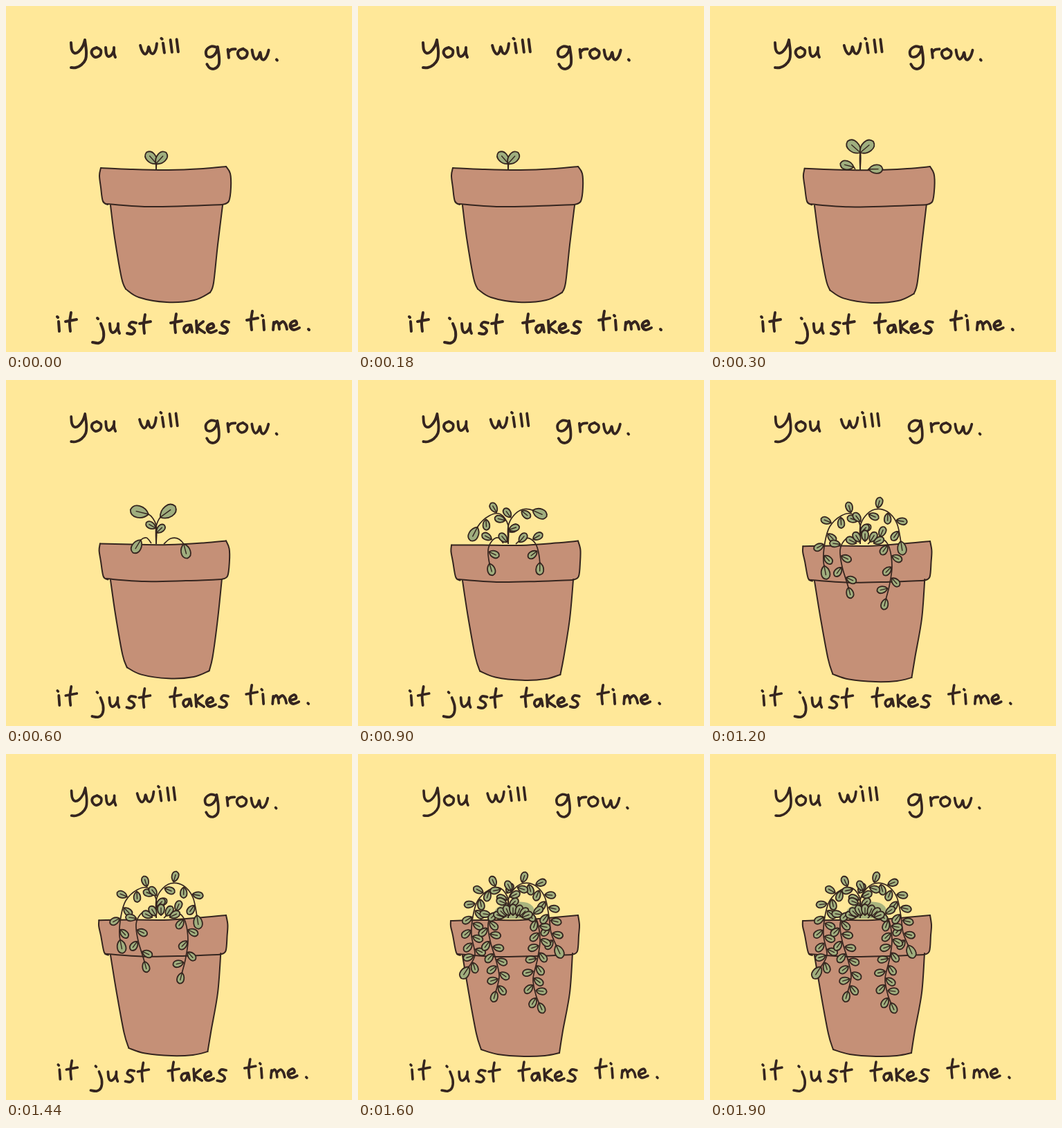
Recreate the animation shown at these times as an HTML page. Size 500 by 500 pixels, loop 2100 ms.

```html
<!DOCTYPE html>
<html lang="en">
<head>
<meta charset="utf-8">
<title>You will grow</title>
<style>
html, body { margin: 0; width: 100%; height: 100%; overflow: hidden; background: #ffe899; }
svg { display: block; width: 100vw; height: 100vh; }
path { fill: none; stroke: #35251f; stroke-linecap: round; stroke-linejoin: round; }
.clay { fill: #c59077; stroke: none; }
.edge { stroke-width: 2; }
.leaf { fill: #9fae7e; stroke-width: 1.8; }
.vein { stroke-width: 1.4; }
.stem { stroke-width: 1.7; stroke-linecap: butt; }
.wash { fill: #a9b47e; }
/* poses stand side by side; the strip jumps from one to the next */
#strip { animation: grow 2100ms step-end infinite; }
@keyframes grow {
  0% { transform: translateX(0); }
  14.2857% { transform: translateX(-500px); }
  28.5714% { transform: translateX(-1000px); }
  42.8571% { transform: translateX(-1500px); }
  57.1429% { transform: translateX(-2000px); }
  76.1905%, 100% { transform: translateX(-2500px); }
}
</style>
</head>
<body>
<svg viewBox="0 0 500 500" role="img" aria-label="you will grow. it just takes time."><g id="strip"></g></svg>
<script>
const points = s => s.trim().split(/\s+/).map(p => p.split(',').map(Number));
const round = n => Math.round(n * 10) / 10;
const path = (d, cls, style = '') => `<path class="${cls}" d="${d}" style="${style}"/>`;

// smooth curve through "x,y x,y ..."
function curve(s, start = 'M') {
  const p = points(s);
  let d = start + p[0];
  for (let i = 0; i < p.length - 1; i++) {
    const a = p[i - 1] || p[i], b = p[i], c = p[i + 1], e = p[i + 2] || c;
    d += 'C' + [b[0] + (c[0] - a[0]) / 6, b[1] + (c[1] - a[1]) / 6,
                c[0] - (e[0] - b[0]) / 6, c[1] - (e[1] - b[1]) / 6].map(round) + ',' + c;
  }
  return d;
}

// hand lettering: advance and pen strokes, baseline at 0
const glyphs = {
  y: [30, '1,-21 2,-11 6,-6 12,-8 18,-16 21,-25|21,-25 23,-9 22,3 16,11 8,15 1,15'],
  o: [20, '8,-14 2,-11 1,-5 6,0 13,-3 14,-10 8,-14'],
  u: [26, '1,-14 2,-5 5,-1 10,-4 13,-10|13,-14 13,-6 15,0'],
  w: [33, '1,-13 3,-5 7,0 11,-4 13,-10 15,-2 19,0 23,-6 25,-14'],
  i: [11, '1,-14 2,0|-1,-21 0,-20'],
  l: [9, '1,-18 2,0'],
  g: [31, '16,-14 8,-15 1,-9 2,-1 9,0 15,-6 17,-14|17,-15 20,0 20,11 14,17 7,16 3,11'],
  r: [15, '1,-12 3,0|2,-8 6,-12 12,-13'],
  t: [19, '8,-27 6,-13 7,0|0,-14 16,-17'],
  j: [26, '14,-14 18,-2 17,9 11,14 2,13|9,-22 10,-21'],
  s: [18, '13,-15 6,-16 3,-11 9,-7 11,-3 7,1 0,0'],
  a: [18, '9,-11 3,-10 0,-5 3,0 8,-4 10,-11 12,-1'],
  k: [16, '0,-17 1,0|10,-16 2,-8 12,0'],
  e: [18, '1,-5 9,-8 7,-13 1,-10 0,-4 5,0 13,-3'],
  m: [21, '0,0 1,-11|1,-8 5,-12 8,-8 9,-1|9,-8 14,-12 18,-8 20,-1'],
  '.': [8, '4,-1 5,0']
};
const words = [
  { text: 'you', x: 93, y: 74, drift: 1 },
  { text: 'will', x: 194, y: 70, drift: -7, tilt: -4 },
  { text: 'grow.', x: 288, y: 73, drift: -2, tilt: 3 },
  { text: 'it', x: 75, y: 470, drift: 2 },
  { text: 'just', x: 123, y: 473, drift: -4 },
  { text: 'takes', x: 238, y: 472, drift: -6 },
  { text: 'time.', x: 348, y: 468, drift: -5, gap: 4 }
];

function lettering(age) {
  return words.map(({ text, x, y, drift, tilt = 0, gap = 0 }) => {
    let pen = 0;
    const letters = [...text].map(ch => {
      const [advance, ink] = glyphs[ch];
      const at = pen;
      pen += advance + gap;
      return `<g transform="translate(${at} 0)">` +
        path(ink.split('|').map(s => curve(s)).join(''), 'pen', `stroke-width:${round(4 - .4 * age)}`) + '</g>';
    });
    return `<g transform="translate(${round(x + drift * age * age)} ${y}) rotate(${tilt})">${letters.join('')}</g>`;
  }).join('');
}

// the pot settles and narrows as the plant ages
function pot(age) {
  const ease = age * age * (3 - 2 * age);
  const m = (from, to) => round(from + (to - from) * ease);
  const topRight = `318,${m(232, 233)}`;
  const lipRight = `${m(313, 309)},${m(287, 290)}`;
  const footLeft = `${m(173, 178)},${m(409, 427)}`;
  const footRight = `${m(295, 291)},${m(414, 432)}`;
  const rim = [
    `${m(147, 148)},${m(287, 291)} ${m(140, 142)},${m(282, 287)} 137,262 ${m(135, 134)},${m(245, 249)} ${m(137, 134)},${m(234, 241)}`,
    `${m(137, 134)},${m(234, 241)} 180,${m(236, 240)} 235,${m(237, 240)} 285,${m(235, 236)} ${topRight}`,
    `${topRight} ${m(324, 320)},${m(242, 247)} ${m(325, 319)},262 ${m(322, 317)},${m(282, 285)} ${lipRight}`,
    `${lipRight} 260,${m(289, 292)} 200,${m(290, 293)} ${m(146, 143)},${m(286, 289)}`
  ];
  const body = [
    `151,${m(288, 291)} ${m(157, 160)},${m(335, 345)} ${m(167, 171)},${m(393, 404)} ${footLeft}`,
    `${footLeft} ${m(192, 202)},${m(421, 434)} ${m(232, 240)},${m(428, 437)} ${m(272, 270)},${m(425, 436)} ${footRight}`,
    `${footRight} ${m(300, 296)},400 306,345 ${m(313, 310)},288`
  ];
  const fill = (edges, close) => path(edges.map((e, i) => curve(e, i ? 'L' : 'M')).join('') + close, 'clay');
  return fill(body, 'L300,270L160,270Z') + fill(rim, 'Z') +
    [...rim, ...body].map(e => path(curve(e), 'edge')).join('');
}

function leaf(x, y, turn, len) {
  const w = len * .38;
  return `<g transform="translate(${round(x)} ${round(y)}) rotate(${round(turn)})">` +
    path(`M0,0C${len * .25},${-w} ${len * .9},${-w * 1.2} ${len},0C${len * .9},${w * 1.2} ${len * .25},${w} 0,0Z`, 'leaf') +
    path(`M0,0L${len * .68},0`, 'vein') + '</g>';
}

// full-grown stems: two arch high, two hang over the rim
const stems = [
  { side: -1, tip: 1, line: '217,237 217,210 206,194 190,196 173,212 166,235 164,262 169,290 160,308' },
  { side: -1, tip: .8, line: '210,236 203,228 194,232 188,246 191,270 200,300 204,322 199,344' },
  { side: 1, tip: 1, line: '217,237 217,212 224,197 238,187 256,190 270,207 276,235 279,258 287,278' },
  { side: 1, tip: .8, line: '228,237 238,229 250,230 259,242 263,270 259,298 253,325 257,348 262,361' }
].map(stem => {
  const track = document.createElementNS('http://www.w3.org/2000/svg', 'path');
  track.setAttribute('d', curve(stem.line));
  return { ...stem, track };
});

// each stem shows its first part, with leaves on alternate sides back from the tip
function vine({ side, tip, line, track }, reach, { size, gap, splay }) {
  if (!reach) return '';
  const at = s => {
    const p = track.getPointAtLength(s), q = track.getPointAtLength(Math.max(0, s - 2));
    return [p.x, p.y, Math.atan2(p.y - q.y, p.x - q.x) * 180 / Math.PI];
  };
  let out = path(curve(line), 'stem', `stroke-dasharray:${reach} 999`);
  for (let s = reach - gap, n = 0; s > 12; s -= gap, n++) {
    const [x, y, turn] = at(s);
    const swing = (n % 2 ? -1 : 1) * side * (58 + 12 * Math.sin(s * 7));
    const angle = (turn + swing) * Math.PI / 180;
    out += leaf(x + 2 * Math.cos(angle), y + 2 * Math.sin(angle), turn + swing, 15.5);
  }
  const [x, y, turn] = at(reach);
  return out + leaf(x, y, turn + side * splay, size * tip);
}

// fan of leaves in the middle of the pot
function crown(count) {
  let out = '';
  for (let i = 0; i < count; i++) {
    const turn = 190 + 160 * (i + .5) / count;
    const a = turn * Math.PI / 180;
    out += leaf(224 + 14 * Math.cos(a), 238 + 5 * Math.sin(a), turn, 16);
  }
  return out;
}

const poses = [
  { reach: [9, 0, 9, 0], size: 22, gap: 25, splay: 45, crown: 0 },
  { reach: [25, 4, 25, 2], size: 25, gap: 25, splay: 42, crown: 0 },
  { reach: [47, 20, 40, 35], size: 27, gap: 25, splay: 18, crown: 0 },
  { reach: [88, 56, 74, 63], size: 22, gap: 18, splay: 5, crown: 2 },
  { reach: [145, 92, 127, 116], size: 20, gap: 16, splay: 0, crown: 5 },
  { reach: [187, 136, 172, 161], size: 20, gap: 9.5, splay: 0, crown: 7 }
];
const wash = path('M196,238Q192,218 226,214T255,238Z', 'wash', 'stroke:none');

document.getElementById('strip').innerHTML = poses.map((pose, i) => {
  const age = i / (poses.length - 1);
  return `<g transform="translate(${i * 500} 0)">` + pot(age) + (age === 1 ? wash : '') +
    stems.map((stem, n) => vine(stem, pose.reach[n], pose)).join('') +
    crown(pose.crown) + lettering(age) + '</g>';
}).join('');
</script>
</body>
</html>
```
